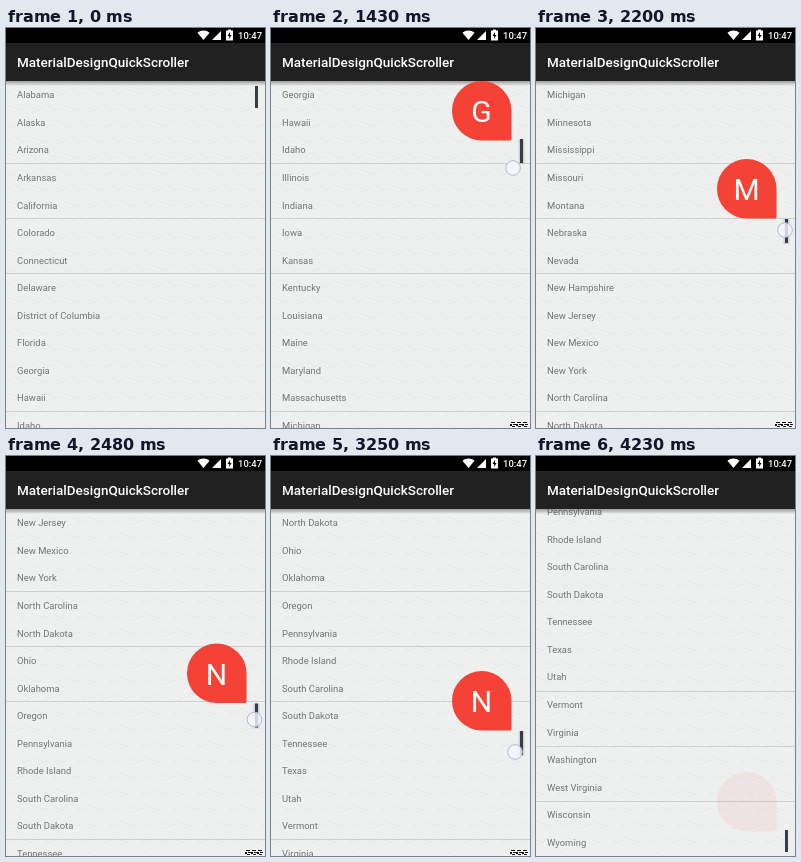
An HTML page with a canvas that plays this animation: 259 by 400 pixels, repeating every 5.51 s.

```html
<!DOCTYPE html>
<html lang="en">
<head>
<meta charset="utf-8">
<title>Quick scroller</title>
<style>
html, body { margin: 0; width: 100%; height: 100%; overflow: hidden; background: #eeefef; }
canvas { display: block; width: 259px; height: 400px; }
</style>
</head>
<body>
<canvas id="stage"></canvas>
<script>
const W = 259, H = 400, TOP = 53, ROW = 27.55, LOOP = 5510, STEP = 70;
const START = 800, RELEASE = 4160, END = 4230;
const states = `Alabama,Alaska,Arizona,Arkansas,California,Colorado,Connecticut,Delaware,
District of Columbia,Florida,Georgia,Hawaii,Idaho,Illinois,Indiana,Iowa,Kansas,Kentucky,
Louisiana,Maine,Maryland,Massachusetts,Michigan,Minnesota,Mississippi,Missouri,Montana,
Nebraska,Nevada,New Hampshire,New Jersey,New Mexico,New York,North Carolina,North Dakota,
Ohio,Oklahoma,Oregon,Pennsylvania,Rhode Island,South Carolina,South Dakota,Tennessee,Texas,
Utah,Vermont,Virginia,Washington,West Virginia,Wisconsin,Wyoming`.split(',').map(s => s.trim());
const maxScroll = states.length * ROW - (H - TOP);

// time, handle top, finger x, finger y
const path = [
  [800, 58, 250, 74], [940, 64, 250, 80], [1290, 94, 250, 118], [1430, 111, 242, 140],
  [1850, 148, 246, 170], [2200, 191, 249, 202], [2760, 304, 248, 325], [2900, 318, 248, 339],
  [3180, 272, 244, 293], [3250, 275, 244, 296], [3530, 332, 245, 350], [4020, 376, 245, 391]
];

const canvas = document.getElementById('stage');
const dpr = window.devicePixelRatio || 1;
canvas.width = W * dpr;
canvas.height = H * dpr;
const c = canvas.getContext('2d');
c.scale(dpr, dpr);

function rect(x, y, w, h, fill) {
  c.fillStyle = fill;
  c.fillRect(x, y, w, h);
}

function shape(points, fill) {
  c.beginPath();
  points.forEach(p => c.lineTo(...p));
  c.closePath();
  c.fillStyle = fill;
  c.fill();
}

function text(s, x, y, size, fill, weight = 400, align = 'left') {
  c.font = `${weight} ${size}px Roboto, sans-serif`;
  c.textAlign = align;
  c.fillStyle = fill;
  c.fillText(s, x, y);
}

function pose(t) {
  const i = path.findIndex(p => p[0] >= t);
  if (i < 0) return path[path.length - 1].slice(1);
  if (i === 0) return path[0].slice(1);
  const a = path[i - 1], b = path[i], k = (t - a[0]) / (b[0] - a[0]);
  return [1, 2, 3].map(n => a[n] + (b[n] - a[n]) * k);
}

function background() {
  rect(0, 0, W, H, '#eeefef');
  c.lineWidth = 1;
  for (let j = 0; j < 45; j++) {
    for (let i = -1; i < 15; i++) {
      const x = i * 19 + (j % 3) * 6, y = TOP + j * 8;
      const d = j % 2 ? 5 : -5;
      for (const [dy, color] of [[0, '#e8eaea'], [1.5, '#f2f3f3']]) {
        c.strokeStyle = color;
        c.beginPath();
        c.moveTo(x, y + dy);
        c.lineTo(x + 12, y + dy + d);
        c.stroke();
      }
    }
  }
}

function list(scroll) {
  const lines = scroll === maxScroll ? [235, 290, 345] : [135, 190, 245, 383];
  lines.forEach(y => rect(0, y, W, 1, '#cdd0d0'));
  states.forEach((s, i) => {
    const y = TOP + i * ROW - scroll;
    if (y > TOP - ROW && y < H) text(s, 11, y + 17.3, 9.44, '#747575');
  });
}

function header() {
  const shade = c.createLinearGradient(0, TOP, 0, TOP + 5);
  shade.addColorStop(0, 'rgba(0,0,0,.35)');
  shade.addColorStop(1, 'rgba(0,0,0,0)');
  rect(0, TOP, W, 5, shade);
  rect(0, 0, W, 15, '#000');
  rect(0, 15, W, TOP - 15, '#212121');
  text('MaterialDesignQuickScroller', 11, 39, 13.49, '#fff', 500);

  c.beginPath();
  c.moveTo(197.5, 12);
  c.arc(197.5, 12, 9.5, -Math.PI * .72, -Math.PI * .28);
  c.fillStyle = '#fff';
  c.fill();
  shape([[206, 12], [215, 3], [215, 12]], '#fff');
  rect(222, 1.5, 3, 2, '#fff');
  rect(220, 2.5, 7, 10, '#fff');
  shape([[224, 4], [221.5, 8], [223.2, 8], [223, 11], [225.6, 7], [224, 7]], '#000');
  text('10:47', 256, 11, 9.44, '#fff', 500, 'right');
}

function bubble(y, letter, alpha) {
  c.globalAlpha = alpha;
  c.beginPath();
  c.roundRect(181, y, 59.5, 59.5, [29.75, 29.75, 1.5, 29.75]);
  c.fillStyle = '#f44336';
  c.fill();
  text(letter, 210.5, y + 41, 30, '#fff', 400, 'center');
  c.globalAlpha = 1;
}

function handle(y, active) {
  if (active) rect(247.5, y, 6, 25, 'rgba(120,125,140,.25)');
  rect(249, y, 3, active ? 24 : 22, '#363c48');
}

function finger(x, y) {
  c.beginPath();
  c.arc(x, y, 7.3, 0, Math.PI * 2);
  c.fillStyle = 'rgba(245,246,252,.82)';
  c.fill();
  c.strokeStyle = '#b3b7d2';
  c.lineWidth = 1;
  c.stroke();
}

function cornerMark() {
  rect(239, 393, 19, 7, '#f4f4f4');
  for (const x of [240, 246, 252]) {
    rect(x, 394, 4, 1, '#111');
    rect(x - 1, 396, 2, 2, '#111');
    rect(x + 2, 396, 3, 1, '#111');
    rect(x + 1, 398, 3, 1, '#111');
  }
}

function draw(time) {
  const t = time < START ? time : Math.min(END, START + Math.floor((time - START) / STEP) * STEP);
  const touching = t >= START && t < RELEASE;
  const [top, fx, fy] = pose(t);
  const index = Math.min(states.length - 1, Math.max(0, Math.floor((top - 40.5) / 6.8)));
  const scroll = t < START ? 0 : Math.min(maxScroll, index * ROW);

  background();
  list(scroll);
  header();
  if (t >= 490 && t < 4090) cornerMark();
  handle(t < START ? 58 : t >= RELEASE ? 374 : top, touching);
  if (t >= START) {
    const alpha = touching ? Math.min(1, (t - START + 10) / 160) : t < END ? .5 : .07;
    bubble(Math.max(TOP, top - 60), states[index][0], alpha);
  }
  if (touching) finger(fx, fy);
}

const begin = performance.now();
function tick() {
  draw((performance.now() - begin) % LOOP);
  requestAnimationFrame(tick);
}
tick();
</script>
</body>
</html>
```
